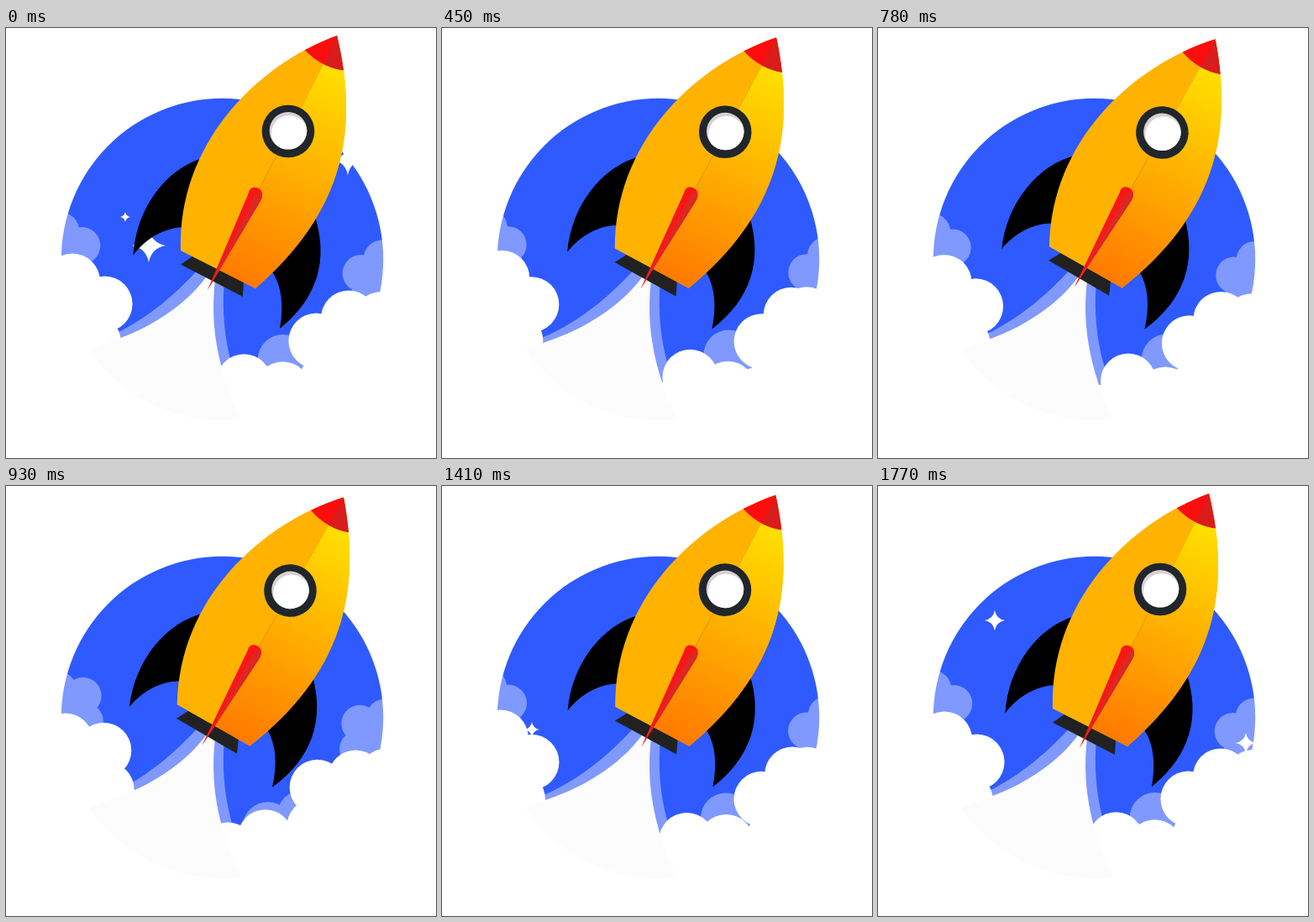
These frames come from a looping animation (512x512 px, 1.8 s). An HTML page with a canvas:

```html
<!DOCTYPE html>
<html lang="en">
<head>
<meta charset="utf-8">
<title>Rocket</title>
<style>
html, body { margin: 0; width: 100%; height: 100%; overflow: hidden; background: #fff; }
canvas { display: block; width: 512px; height: 512px; }
</style>
</head>
<body>
<canvas id="stage" width="512" height="512"></canvas>
<script>
const ctx = document.getElementById("stage").getContext("2d");
const LOOP = 1800, STEP = 30, TAU = Math.PI * 2, RAD = Math.PI / 180;
const BLUE = "#2e5aff", PALE = "#8099ff", WHITE = "#fff";
const { sin, cos } = Math;

// Twinkles, each seen at its brightest
const LIFE = 120;
const stars = [
  { t: 0, x: 142, y: 225, r: 6 },
  { t: 0, x: 170, y: 259, r: 20 },
  { t: 0, x: 407, y: 157, r: 18 },
  { t: 270, x: 194, y: 146, r: 5 },
  { t: 270, x: 303, y: 350, r: 10 },
  { t: 630, x: 87, y: 253, r: 7 },
  { t: 1410, x: 107, y: 290, r: 9 },
  { t: 1770, x: 139, y: 160, r: 12 },
  { t: 1770, x: 438, y: 306, r: 12 }
];

function dot(x, y, r, color) {
  ctx.fillStyle = color;
  ctx.beginPath();
  ctx.arc(x, y, r, 0, TAU);
  ctx.fill();
}

function shape(d, color) {
  ctx.fillStyle = color;
  ctx.fill(new Path2D(d));
}

// Five round lobes on a turning ring
function puff(x, y, turn, ring, r, color) {
  dot(x, y, ring, color);
  for (let i = 0; i < 5; i++) {
    const a = (turn + i * 72) * RAD;
    dot(x + ring * cos(a), y + ring * sin(a), r, color);
  }
}

function mirrored(axis, dy, draw) {
  draw();
  ctx.save();
  ctx.translate(axis, dy);
  ctx.scale(-1, 1);
  draw();
  ctx.restore();
}

function star(x, y, r) {
  const q = r * 0.16;
  ctx.fillStyle = WHITE;
  ctx.beginPath();
  ctx.moveTo(x, y - r);
  ctx.quadraticCurveTo(x + q, y - q, x + r, y);
  ctx.quadraticCurveTo(x + q, y + q, x, y + r);
  ctx.quadraticCurveTo(x - q, y + q, x - r, y);
  ctx.quadraticCurveTo(x - q, y - q, x, y - r);
  ctx.fill();
}

function drawStars(t) {
  for (const s of stars) {
    const dt = t - s.t, k = 1 - Math.abs(dt) / LIFE;
    if (k > 0) star(s.x - dt * 0.2, s.y + dt * 0.36, s.r * Math.sqrt(k));
  }
}

// The smoke turns once per loop while its centre circles twice
function smoke(t) {
  const u = Math.min(1, t / (LOOP - STEP)), a = u * TAU;
  const x = 75 + 9 * cos(2 * a - 0.63) - 2.5 * cos(3 * a);
  const y = 339.5 + 3.5 * cos(2 * a + 0.94);
  return {
    side: { x, y, turn: -19 + 360 * u - 12 * (sin(a) - sin(2 * a)) },
    low: {
      x: 304 - 12 * cos(2 * a - 1.26),
      y: y + 116,
      turn: -106 - 360 * u + 19 * sin(a - 0.5)
    }
  };
}

function drawSky(t) {
  const { side: s, low: b } = smoke(t);
  ctx.fillStyle = BLUE;
  ctx.fillRect(40, 60, 440, 430);

  mirrored(513, 33, () => puff(s.x - 14, s.y - 74, s.turn, 26, 22, PALE));
  puff(b.x + 45, b.y - 29, b.turn, 37, 30, PALE);
  shape("M232 284C205 314 172 344 128 365L95 378V470H300C266 415 255 360 260 300Z", PALE);
  drawStars(t);

  mirrored(487, 44, () => {
    puff(s.x, s.y, s.turn, 40, 33, WHITE);
    dot(120 - s.x, 300 + 1.5 * (s.y - 339.5), 33, WHITE);
  });
  puff(b.x, b.y, b.turn, 40, 33, WHITE);
  dot(378, 452, 48, WHITE);
  dot(95, 402, 32, WHITE);
  shape("M240 294C218 326 178 354 134 370L98 383V480H286C254 414 242 360 249 300Z", "#fcfcfc");

  // White surround leaves only the round window
  const rim = new Path2D("M0 0H512V512H0Z");
  rim.arc(257.5, 275.5, 191.7, 0, TAU);
  ctx.fillStyle = WHITE;
  ctx.fill(rim, "evenodd");
}

function drawRocket(t) {
  const swing = (1 - cos(t / LOOP * TAU)) / 2;
  ctx.save();
  ctx.translate(305, 175);
  ctx.rotate(2.8 * RAD * swing);
  ctx.translate(-305, -175);

  shape("M234 155C190 168 155 215 151.5 270.5C168 248 193 236 216 237Z", "#000");
  shape("M367 222C385 275 371 322 326 358C331 330 328 307 317 290Z", "#000");
  shape("M222 272L208 281.5L282 320L283 302Z", "#212121");

  const body = new Path2D("M394 9C296 45 204 140 208 265L297 310C402 219 421 122 394 9Z");
  ctx.save();
  ctx.clip(body);
  ctx.fillStyle = "#ffb300";
  ctx.fillRect(150, 0, 300, 330);
  const glow = ctx.createLinearGradient(398, 45, 282, 300);
  glow.addColorStop(0, "#ffe100");
  glow.addColorStop(1, "#ff7b00");
  shape("M394 9L252.5 287.5L297 330L450 250V0Z", glow);
  ctx.strokeStyle = "rgba(190,120,0,.55)";
  ctx.lineWidth = 0.8;
  ctx.stroke(new Path2D("M378 42L300 195"));
  shape("M396 0L345 12L355.5 26Q366 37 378 43Q390 49 403 50.5L420 45Z", "#fb0d0d");
  shape("M394 9L378 43Q390 49 403 50.5L420 45Z", "#d91c1c");
  ctx.restore();

  dot(336, 123, 31.3, "#20262a");
  dot(336, 122.3, 22.3, "#d8d0d5");
  ctx.save();
  ctx.beginPath();
  ctx.arc(336, 122.3, 22.3, 0, TAU);
  ctx.clip();
  dot(337.5, 125.5, 21.5, WHITE);
  ctx.restore();

  shape("M289 196C290 188 300 188 304 194C306 198 305 202 303 206L240 312Z", "#fb1514");
  shape("M297 198L304.5 196C306 200 304 204 303 206L240 312Z", "#dc2824");
  ctx.restore();
}

const start = performance.now();
function frame(now) {
  const t = Math.floor((Math.max(0, now - start) % LOOP) / STEP) * STEP;
  drawSky(t);
  drawRocket(t);
  requestAnimationFrame(frame);
}
frame(start);
</script>
</body>
</html>
```
